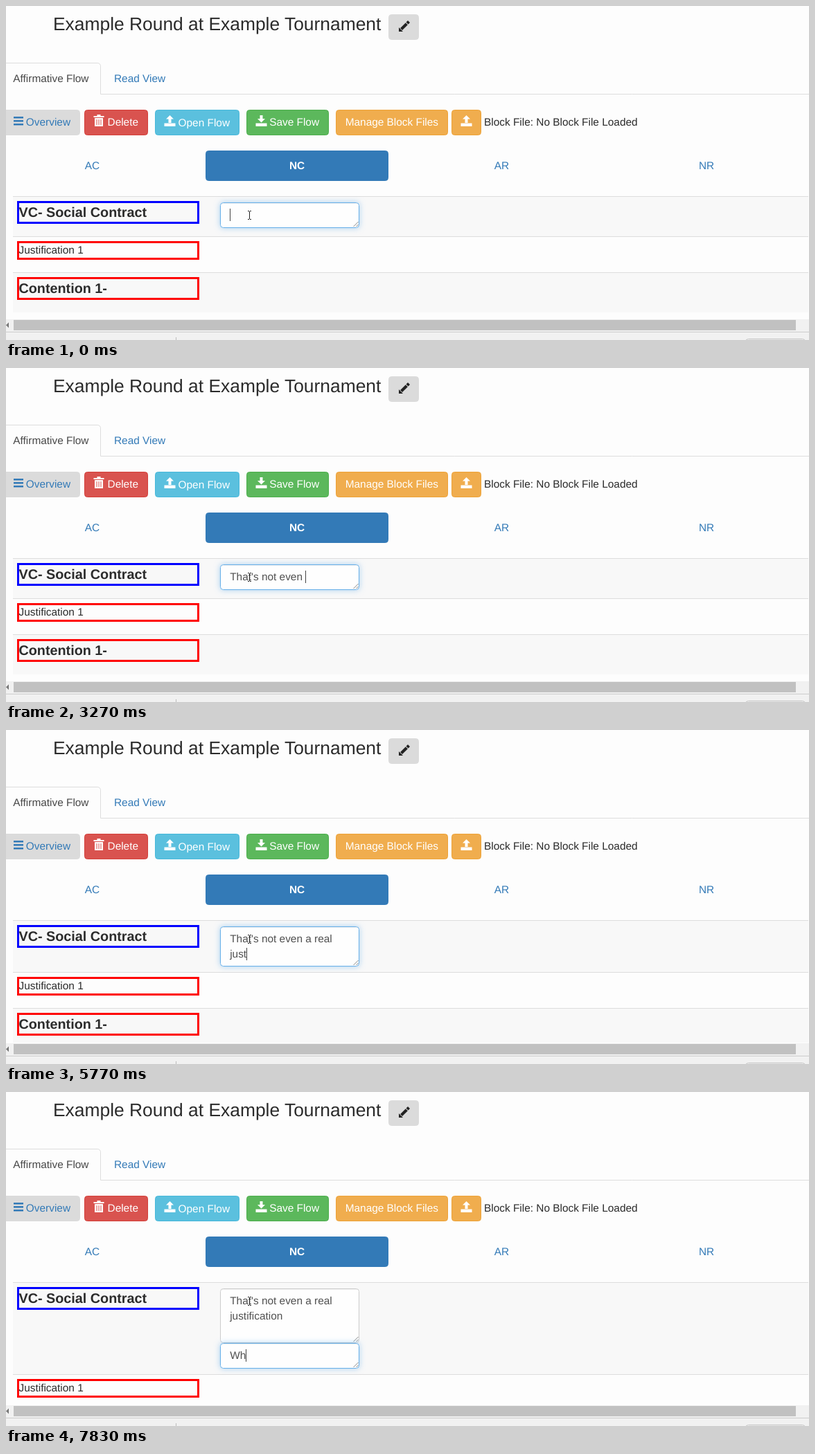
These frames come from a looping animation (1159x483 px, 8 s). An HTML page with a canvas:

```html
<!DOCTYPE html>
<html lang="en">
<head>
<meta charset="utf-8">
<title>Flow editor</title>
<style>
html, body { margin: 0; width: 100%; height: 100%; overflow: hidden; background: #fdfdfd; }
canvas { display: block; }
</style>
</head>
<body>
<canvas id="stage" width="1159" height="483"></canvas>
<script>
const ctx = document.getElementById('stage').getContext('2d');
const W = 1159, H = 483, LOOP = 8000;
const SANS = '"Liberation Sans", Arial, sans-serif';
const BODY = `15.4px ${SANS}`;
const BOLD = `bold 15.4px ${SANS}`;
const H3 = `26.4px ${SANS}`;
const H4 = `bold 19.8px ${SANS}`;
const LINK = '#337ab7', INK = '#2b2b2b', FIELD = '#505050';
const PAGE = '#fdfdfd', STRIPE = '#f8f8f8', RULE = '#ddd', GRAY = '#dbdbdb';

const FIRST_LINE = "That's not even a real ";
const SCRIPT = FIRST_LINE + 'justification\nWh';
// Each burst types `count` characters evenly between two times
const BURSTS = [
  { from: 850, to: 1230, count: 3 },
  { from: 1630, to: 2640, count: 8 },
  { from: 2710, to: 3500, count: 7 },
  { from: 3980, to: 4210, count: 3 },
  { from: 4670, to: 4990, count: 2 },
  { from: 5250, to: 5770, count: 4 },
  { from: 5830, to: 5910, count: 2 },
  { from: 6080, to: 6850, count: 7 },
  { from: 7250, to: 7250, count: 1 },
  { from: 7680, to: 7830, count: 2 },
];
const FOCUSED = 7320;

function typedCount(t) {
  let total = 0;
  for (const { from, to, count } of BURSTS) {
    if (t < from) break;
    const gap = (to - from) / Math.max(1, count - 1);
    total += gap ? Math.min(count, 1 + Math.floor((t - from) / gap + 1e-6)) : count;
  }
  return total;
}

function rect(x, y, w, h, color) {
  ctx.fillStyle = color;
  ctx.fillRect(x, y, w, h);
}

function label(text, x, y, color = INK, font = BODY, align = 'left') {
  ctx.font = font;
  ctx.textAlign = align;
  ctx.fillStyle = color;
  ctx.fillText(text, x, y);
}

function rounded(x, y, w, h, fill, border = fill) {
  ctx.beginPath();
  ctx.roundRect(x + .5, y + .5, w - 1, h - 1, 4);
  ctx.fillStyle = fill;
  ctx.fill();
  ctx.strokeStyle = border;
  ctx.lineWidth = 1;
  ctx.stroke();
}

function triangle(x, y, dx, dy, color) {
  ctx.beginPath();
  ctx.moveTo(x + dx, y + dy);
  ctx.lineTo(x - dy, y + dx);
  ctx.lineTo(x + dy, y - dx);
  ctx.fillStyle = color;
  ctx.fill();
}

// Icons take their left edge and sit on the toolbar line
function arrowIcon(x, up) {
  rect(x, 169.5, 16, 4.5, '#fff');
  rect(x + 6, up ? 162 : 158, 4, 7, '#fff');
  triangle(x + 8, up ? 163.5 : 163, 0, up ? -5.5 : 5.5, '#fff');
}
const uploadIcon = x => arrowIcon(x, true);
const downloadIcon = x => arrowIcon(x, false);

function trashIcon(x) {
  rect(x + 5, 157, 5, 2, '#fff');
  rect(x, 159, 15, 2, '#fff');
  rect(x + 1.5, 162, 12, 12, '#fff');
  for (let i = 0; i < 3; i++) rect(x + 4 + i * 3, 164, 1, 8, '#d9534f');
}

function menuIcon(x) {
  for (let i = 0; i < 3; i++) rect(x - 2.5, 160 + i * 5, 14, 2.5, LINK);
}

function pencilIcon(x, y) {
  ctx.save();
  ctx.translate(x, y);
  ctx.rotate(-Math.PI / 4);
  triangle(4.2, 0, -4.2, 0, '#222');
  rect(5, -2.1, 11, 4.2, '#222');
  rect(17, -2.1, 3.5, 4.2, '#222');
  ctx.restore();
}

function button(x, w, text, fill, border, icon, color = '#fff', baseline = 173) {
  rounded(x, 150, w, 37, fill, border);
  if (icon) icon(x + 13.5);
  label(text, x + w - 14, baseline, color, BODY, 'right');
}

function header() {
  label('Example Round at Example Tournament', 68, 35, INK, H3);
  rounded(552, 12, 44, 37, GRAY);
  pencilIcon(567, 37);

  ctx.beginPath();
  ctx.moveTo(0, 82.5);
  ctx.arcTo(136.5, 82.5, 136.5, 127.5, 4.4);
  ctx.lineTo(136.5, 127.5);
  ctx.lineTo(W, 127.5);
  ctx.strokeStyle = RULE;
  ctx.lineWidth = 1;
  ctx.stroke();
  label('Affirmative Flow', 10.3, 110, '#484848');
  label('Read View', 156, 110, LINK);
}

function toolbar() {
  button(-.5 - 4.5, 112, 'Overview', GRAY, GRAY, null, LINK);
  menuIcon(13.5);
  button(113, 92, 'Delete', '#d9534f', '#d43f3a', trashIcon);
  button(215, 122, 'Open Flow', '#5bc0de', '#46b8da', uploadIcon, '#fff', 174);
  button(347, 119, 'Save Flow', '#5cb85c', '#4cae4c', downloadIcon);
  button(476, 162, 'Manage Block Files', '#f0ad4e', '#eea236');
  button(643, 43, '', '#f0ad4e', '#eea236', uploadIcon);
  label('Block File: No Block File Loaded', 690, 173);
}

function speeches() {
  rounded(288, 209, 264, 44, LINK);
  ['AC', 'NC', 'AR', 'NR'].forEach((name, i) => {
    const active = name === 'NC';
    label(name, 124.5 + i * 295.5, 236, active ? '#fff' : LINK, active ? BOLD : BODY, 'center');
  });
}

// Draws one table row with its outlined argument and returns the row's bottom
function row(top, height, text, color, fill, big) {
  rect(10, top, 1148, height, fill);
  rect(10, top, 1148, 1, RULE);
  ctx.strokeStyle = color;
  ctx.lineWidth = 3;
  ctx.strokeRect(17.5, top + 8.5, 260, big ? 30 : 24);
  label(text, 18.5, top + (big ? 30 : 25), INK, big ? H4 : BODY);
  return top + height;
}

// glow runs from 0 (no focus) to 1 (full focus)
function textArea(top, height, glow, lines) {
  ctx.save();
  ctx.shadowColor = `rgba(102, 175, 233, ${.55 * glow})`;
  ctx.shadowBlur = 8.8;
  ctx.beginPath();
  ctx.roundRect(309, top, 201, height, 4.4);
  ctx.fillStyle = '#fff';
  ctx.fill();
  ctx.restore();
  rounded(309, top, 201, height, '#fefefe', glow > .5 ? '#66afe9' : '#ccc');
  rect(312, top + 1, 195, 1, 'rgba(0, 0, 0, .06)');

  ctx.beginPath();
  for (const size of [7, 3]) {
    ctx.moveTo(508.5 - size, top + height - 2);
    ctx.lineTo(508.5, top + height - 2 - size);
  }
  ctx.strokeStyle = '#888';
  ctx.stroke();
  lines.forEach((text, i) => label(text, 323.2, top + 23 + i * 22, FIELD));
}

function caret(text, top) {
  ctx.font = BODY;
  rect(Math.floor(323.2 + ctx.measureText(text).width), top, 1, 18, '#444');
}

function pointer() {
  rect(351, 297, 1, 11, '#222');
  for (const y of [296, 308]) {
    rect(349, y, 2, 1, '#222');
    rect(352, y, 2, 1, '#222');
  }
}

function table(t) {
  const [first, reply] = SCRIPT.slice(0, typedCount(t)).split('\n');
  const split = reply !== undefined;
  const wrapped = first.slice(FIRST_LINE.length);
  const lines = [first.slice(0, FIRST_LINE.length)];
  if (wrapped) lines.push(wrapped);

  const top = 284, single = 37;
  const height = single + 21 * (split ? 2 : lines.length - 1);
  const second = top + height;
  const bottom = split ? second + single : second;

  ctx.save();
  ctx.beginPath();
  ctx.rect(0, 270, W, 182);
  ctx.clip();

  let y = row(275, Math.max(58, bottom + 8 - 275), 'VC- Social Contract', '#00f', STRIPE, true);
  y = row(y, 52, 'Justification 1', '#f00', PAGE, false);
  row(y, 58, 'Contention 1-', '#f00', STRIPE, true);

  const focus = t >= FOCUSED ? 1 : .6;
  textArea(top, height, split ? 1 - focus : 1, lines);
  if (split) {
    textArea(second, single, focus, [reply]);
    caret(reply, second + 9);
  } else if (wrapped) {
    caret(wrapped, top + 31);
  } else {
    // The space that ends a full line leaves the caret in place
    caret(first === FIRST_LINE ? first.trimEnd() : first, top + 9);
  }
  pointer();
  ctx.restore();
}

function footer() {
  rect(0, 453, W, 18, '#f1f1f1');
  rect(11, 454, 1129, 15, '#c1c1c1');
  triangle(4, 461.5, -4, 0, '#777');
  rect(0, 471, W, 12, '#f1f1f1');
  rect(0, 471, W, 1, '#ccc');
  rect(245, 479, 1, 4, '#bbb');
  rounded(1067, 481, 87, 20, '#ececec', '#c4c4c4');
}

function draw() {
  ctx.textRendering = 'geometricPrecision';
  rect(0, 0, W, H, PAGE);
  header();
  toolbar();
  speeches();
  table(performance.now() % LOOP);
  footer();
  requestAnimationFrame(draw);
}
draw();
</script>
</body>
</html>
```
